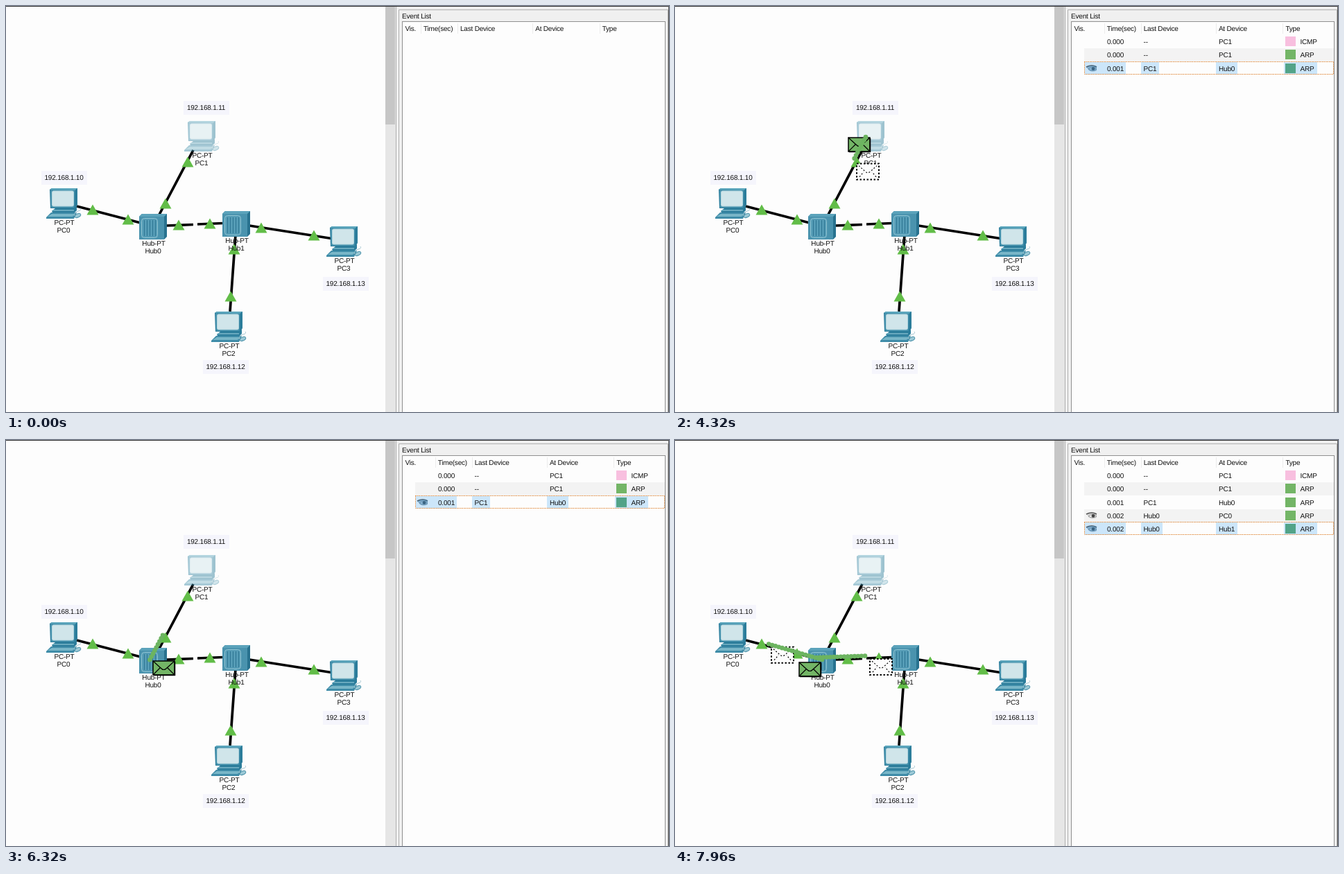
An HTML page for the animation above (8000 ms loop, 956 by 586 pixels).

```html
<!DOCTYPE html>
<html lang="en">
<head>
<meta charset="utf-8">
<title>ARP broadcast through hubs</title>
<style>
html, body { margin: 0; width: 100%; height: 100%; overflow: hidden; background: #fdfdfd; }
svg { display: block; width: 956px; height: 586px; font: 10px "Liberation Sans", Arial, sans-serif; letter-spacing: -.2px; text-rendering: geometricPrecision; }
.mid { text-anchor: middle; }
</style>
</head>
<body>
<svg viewBox="0 0 956 586">
  <defs>
    <g id="pc">
      <path d="M1 3L4 1H41V25L38 30H2Z" fill="#2c7d9b"/>
      <path d="M1 3L4 1H41L37 4Z" fill="#60a9bf"/>
      <path d="M2 3.500H37L36.500 29H3Z" fill="#4793ae"/>
      <rect x="4.500" y="5" width="31" height="22" rx="2" fill="#d0e5ea" stroke="#b2d4dd"/>
      <path d="M9 30H35L40 27V33L37 36H5L4 34Z" fill="#2c7d9b"/>
      <path d="M5 33H36" stroke="#7cb8ca" stroke-width="1.500"/>
      <path d="M-4 43L3 36H40L36 45H-4Z" fill="#3f8ca8"/>
      <path d="M-2 42L4 38H37L34 42Z" fill="#79b6c8"/>
      <path d="M36 41Q37 35 42 34T45 30" fill="none" stroke="#a9c9d3"/>
      <ellipse cx="41.500" cy="40.500" rx="4.500" ry="2.500" transform="rotate(-25 41.500 40.500)" fill="#9cc9d6" stroke="#4c93aa"/>
    </g>
    <g id="hub">
      <path d="M0 4L4 0H40V33L36 37H0Z" fill="#28728f"/>
      <path d="M0 4L4 0H40L36 4Z" fill="#5ba3bb"/>
      <path d="M0 4H36V37H0Z" fill="#4a93ae"/>
      <rect x="3.500" y="6.500" width="23" height="28" rx="4" fill="#559cb6" stroke="#8fc3d2"/>
      <path d="M7.500 9V32M11.500 9V32M15.500 9V32M19.500 9V32M23.500 9V32" stroke="#2d7592"/>
    </g>
    <g id="mail">
      <rect x="1" y="1" width="31" height="20" stroke="#000" stroke-width="1.500"/>
      <path d="M1 1L12 11Q16.500 16 21 11L32 1M1 21L11 11M32 21L22 11" fill="none" stroke="#000" stroke-width="1.200"/>
      <path d="M2 21.500H32.500V2" fill="none" stroke="#000" stroke-width="1.500"/>
    </g>
    <g id="ghost">
      <rect x="1" y="1" width="32" height="23" fill="#fdfdfd" stroke="#000" stroke-width="2" stroke-dasharray="2.500 2.500"/>
      <path d="M4 4L13 12Q17 16 21 12L30 4M5 20L11 13M29 20L23 13" fill="none" stroke="#000" stroke-width="1.200" stroke-dasharray="2 2.500"/>
    </g>
    <g id="eye">
      <path d="M-8 -2Q-1 -6 7 -3V3Q1 6 -4 3Z" fill="#d4d4d4"/>
      <path d="M-8 -2Q0 -6 7 -2" fill="none" stroke="#555" stroke-width="1.500"/>
      <path d="M-5 1Q1 -4 7 1Q1 5 -5 1Z" fill="#f2f2f2" stroke="#888" stroke-width=".8"/>
      <circle cx="2" cy=".5" r="2.400" fill="#444"/>
    </g>
    <g id="eyeBlue">
      <use href="#eye"/>
      <path d="M-8 -2Q-1 -6 7 -3V3Q1 6 -4 3Z" fill="#2f86c4" opacity=".5"/>
    </g>
    <clipPath id="upper"><rect width="35" height="13"/></clipPath>
  </defs>
  <g id="scene"></g>
  <g id="table"></g>
  <g id="packets"></g>
</svg>
<script>
const LOOP = 8000, STEP = 40, TRAVEL = 1400;
const GREEN = '#73b566', PINK = '#f8bfdf';
const $ = id => document.getElementById(id);
const rect = (x, y, w, h, fill, more = '') =>
  `<rect x="${x}" y="${y}" width="${w}" height="${h}" fill="${fill}" ${more}/>`;
const text = (x, y, s, cls = '') => `<text x="${x}" y="${y}" class="${cls}" fill="#111">${s}</text>`;
const use = (id, x, y, more = '') => `<use href="#${id}" x="${x}" y="${y}" ${more}/>`;

function drawScene() {
  const pcs = [[62, 262], [261, 165, 'opacity=".45"'], [300, 440], [466, 317]];
  const hubs = [[192, 300], [312, 296]];
  const ips = [[51, 238], [256, 137], [284, 511], [457, 391]];
  const lights = [[125, 294], [176, 308], [262, 225], [230, 285], [249, 316],
    [294, 314], [368, 320], [444, 331], [329, 351], [324, 419]];
  const label = (x, y, kind, name) => text(x, y, kind, 'mid') + text(x - 1, y + 10.7, name, 'mid');
  let s = rect(0, 0, 956, 586, '#fdfdfd');
  s += '<path d="M102 289L194 313M221 301L270 208M231 317L270 315.500M276 315L313 313.500M351 317L469 335.500M331 330L323 441" stroke="#000" stroke-width="3.700"/>';
  s += pcs.map(p => use('pc', ...p)).join('') + hubs.map(p => use('hub', ...p)).join('');
  s += lights.map(([x, y]) => `<path d="M${x} ${y - 7.5}l8.500 15h-17z" fill="#62bd48"/>`).join('');
  s += ips.map(([x, y], i) => rect(x, y, 66, 20, '#f5f5fc') + text(x + 32.5, y + 13, '192.168.1.1' + i, 'mid')).join('');
  s += pcs.map(([x, y], i) => label(x + 22, y + 54, 'PC-PT', 'PC' + i)).join('');
  s += hubs.map(([x, y], i) => label(x + 21, y + 46, 'Hub-PT', 'Hub' + i)).join('');
  // scroll bar and side panel
  s += rect(547, 0, 15, 586, '#e6e6e6') + rect(547, 1, 14, 170, '#c6c6c6');
  s += rect(562, 0, 394, 586, '#f0f0f0') + '<path d="M562.500 0V586M566.500 586V5.500H954.500V586" fill="none" stroke="#b0b0b0"/>';
  s += rect(571.5, 22.5, 379, 570, '#fdfdfd', 'stroke="#909090"');
  s += text(571, 18, 'Event List') + rect(0, 0, 956, 1, '#333') + rect(955, 0, 1, 586, '#555');
  $('scene').innerHTML = s;
}

const EVENTS = [
  ['0.000', '--', 'PC1', 'ICMP'],
  ['0.000', '--', 'PC1', 'ARP'],
  ['0.001', 'PC1', 'Hub0', 'ARP'],
  ['0.002', 'Hub0', 'PC0', 'ARP'],
  ['0.002', 'Hub0', 'Hub1', 'ARP']
];

function drawRow([time, last, at, type], i, selected, visible, focus) {
  const y = Math.round(51 + 19.3 * i), top = y - 9, base = y + 3.5;
  const width = s => ({ 2: 14, 3: 26, 4: 31 })[s.length];
  const mark = focus ? '#cce6fa' : '#d0d0d0';
  let s = i % 2 ? rect(590, top, 360, 19, '#f3f3f3') : '';
  if (selected) {
    s += [[591, 59], [672, width(last)], [780, width(at)], [878, 48]]
      .map(([x, w]) => rect(x, top, w, 18, mark)).join('');
    if (focus) s += rect(590.5, top - .5, 359, 18, 'none', 'stroke="#e08a3c" stroke-dasharray="1.500 1"');
  }
  if (visible) s += use(selected ? 'eyeBlue' : 'eye', 601, y);
  s += rect(880, y - 7, 15, 14, type == 'ICMP' ? PINK : selected ? '#52a388' : GREEN);
  return s + text(623, base, time) + text(675.5, base, last) + text(784, base, at) + text(901.5, base, type);
}

function drawTable(t) {
  const count = t < 960 ? 0 : t < 3880 ? 2 : t < 7040 ? 3 : 5;
  const shift = count ? 20.7 : 0;
  const heads = [[602, 'Time(sec)'], [655, 'Last Device'], [763.2, 'At Device'], [859.7, 'Type']];
  let s = text(575.5, 36.3, 'Vis.');
  for (const [x, name] of heads)
    s += text(x + shift, 36.3, name) + rect(Math.round(x + shift - 4), 25, 1, 15, '#ececec');
  const now = count && EVENTS[count - 1][0];
  return s + EVENTS.slice(0, count)
    .map((e, i) => drawRow(e, i, i == count - 1, e[0] == now, count > 2)).join('');
}

const mail = (x, y, fill, more = '') => use('mail', 0, 0, `fill="${fill}" transform="translate(${x} ${y})" ${more}`);
const clamp = v => Math.max(0, Math.min(1, v));

// A beaded streak from fraction a to fraction b of a path.
function trail([x0, y0, x1, y1], a, b) {
  if (b <= a) return '';
  const n = Math.hypot(x1 - x0, y1 - y0) / 5;
  let s = '';
  for (let i = Math.ceil(a * n); i <= b * n; i++)
    s += `<circle cx="${x0 + (x1 - x0) * i / n}" cy="${y0 + (y1 - y0) * i / n}" r="3.300"/>`;
  return `<g fill="#6cb460">${s}</g>`;
}

const ghost = ([x0, y0, x1, y1], f) => use('ghost', x0 + (x1 - x0) * f + 4, y0 + (y1 - y0) * f + 3.5);

function drawPackets(t) {
  const up = [275, 189, 207, 318];
  const out = [[212, 317, 82, 279], [204, 314, 324, 310]];
  if (t < 960) return '';
  if (t < 3880) return mail(282, 187, PINK) + mail(313, 187, GREEN);
  if (t < 7040) {
    const head = clamp((t - 3950) / TRAVEL), tail = clamp((t - 5330) / TRAVEL);
    const arrived = t >= 5440;
    let s = arrived
      ? `<g transform="translate(211 318)"><g ${t < 5520 ? 'clip-path="url(#upper)"' : ''}>${mail(0, 0, GREEN)}</g></g>`
      : mail(249, 189, GREEN);
    s += trail(up, tail, head);
    if (!arrived && head > 0) s += ghost(up, head);
    return s;
  }
  const f = clamp((t - 7120) / TRAVEL);
  let s = mail(178, 320, GREEN);
  if (f > 0) s += out.map(p => ghost(p, f)).join('') + out.map(p => trail(p, 0, f)).join('');
  return s;
}

let shown = -1;
function frame(now) {
  const t = Math.floor(now % LOOP / STEP) * STEP;
  if (t != shown) {
    shown = t;
    $('table').innerHTML = drawTable(t);
    $('packets').innerHTML = drawPackets(t);
  }
  requestAnimationFrame(frame);
}

drawScene();
frame(performance.now());
</script>
</body>
</html>
```
